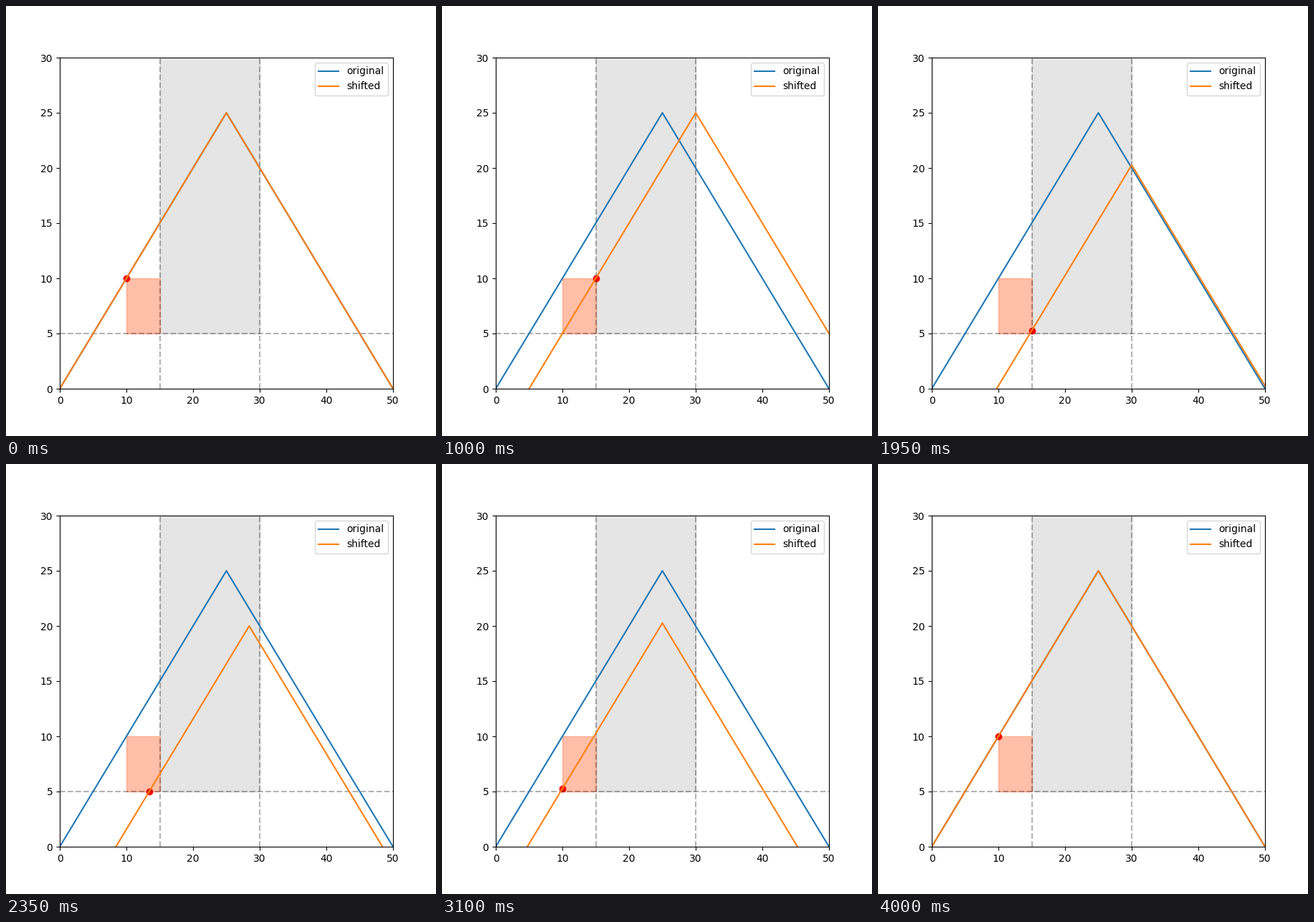
Recreate the animation shown at these times as a matplotlib script. Size 600x600 px, loop 4050 ms.

```python
import numpy as np
import matplotlib.pyplot as plt
from matplotlib.animation import FuncAnimation
from matplotlib.patches import Rectangle

STEPS = 20          # frames per side of the square path
SHIFT = 5
CORNERS = [(0, 0), (SHIFT, 0), (SHIFT, -SHIFT), (0, -SHIFT), (0, 0)]
DOT = np.array([10, 10])

x = np.array([0, 25, 50])
y = np.array([0, 25, 0])

fig, ax = plt.subplots(figsize=(6, 6), dpi=100)
ax.set_xlim(0, 50)
ax.set_ylim(0, 30)

ax.add_patch(Rectangle((15, 5), 15, 25, color="gray", alpha=0.2))
ax.add_patch(Rectangle((10, 5), 5, 5, color="coral", alpha=0.5))
guide = dict(color="black", linestyle="--", alpha=0.3)
ax.axvline(15, **guide)
ax.axvline(30, **guide)
ax.axhline(5, **guide)

ax.plot(x, y, color="tab:blue", label="original")
shifted, = ax.plot(x, y, color="tab:orange", label="shifted")
dot = ax.scatter(*DOT, color="red")
ax.legend(loc="upper right")


def offset(frame):
    """Position on the square path; each corner is held for one extra frame."""
    if frame == 0:
        return np.zeros(2)
    side, step = divmod(frame - 1, STEPS)
    start, end = np.array(CORNERS[side]), np.array(CORNERS[side + 1])
    return start + (end - start) * step / (STEPS - 1)


def update(frame):
    dx, dy = offset(frame)
    shifted.set_data(x + dx, y + dy)
    dot.set_offsets([DOT + (dx, dy)])
    return shifted, dot


anim = FuncAnimation(fig, update, frames=4 * STEPS + 1, interval=50,
                     repeat=True, repeat_delay=0)
plt.show()
```
